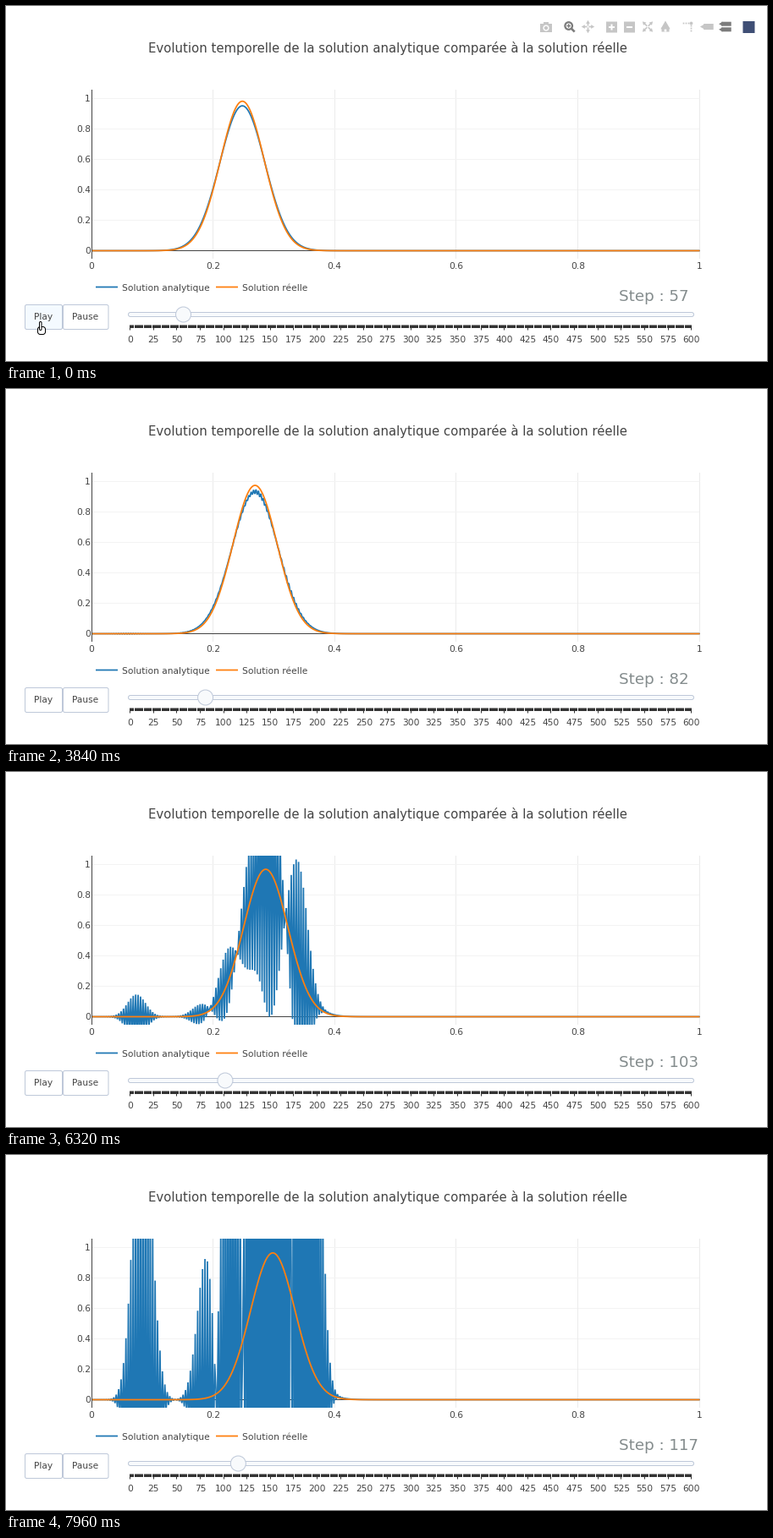
A matplotlib script that plays this animation: 899 by 420 pixels, repeating every 8000 ms.

```python
import numpy as np
import matplotlib.pyplot as plt
from matplotlib.animation import FuncAnimation
from matplotlib.collections import LineCollection
from matplotlib.patches import Circle, FancyBboxPatch, Polygon, Rectangle

W, H, DPI = 899, 420, 100
FRAMES, INTERVAL = 160, 50
PT = 72 / DPI
SMALL = 10.6
BLUE, ORANGE, INK, EDGE = "#1f77b4", "#ff7f0e", "#444444", "#bec8d9"
LIGHT, DARK, HOVER = "#c6c6c6", "#7c7c7c", "#f4faff"
LEFT, RIGHT, TOP, BOTTOM, ZERO, UNIT = 101.5, 819.5, 99, 299, 289.5, 180

plt.rcParams["font.family"] = "DejaVu Sans"
plt.rcParams["path.simplify"] = False
plt.rcParams["path.snap"] = False

fig = plt.figure(figsize=(W / DPI, H / DPI), dpi=DPI, facecolor="white")
ax = fig.add_axes([0, 0, 1, 1])
ax.set_xlim(0, W)
ax.set_ylim(H, 0)
ax.axis("off")


def px(x):
    return LEFT + (RIGHT - LEFT) * x


def py(y):
    return ZERO - UNIT * y


def label(x, y, s, size=SMALL, ha="center", color=INK):
    return ax.text(x, y, s, fontsize=size * PT, ha=ha, va="baseline",
                   color=color, zorder=6)


def line(xs, ys, color, width=1.0, z=1, **kw):
    return ax.plot(xs, ys, color=color, lw=width * PT, zorder=z,
                   solid_capstyle="butt", **kw)[0]


def add(patch, z=3):
    patch.set_zorder(z)
    return ax.add_patch(patch)


def box(x, y, w, h, radius, face, edge=EDGE, z=3):
    shape = f"round,pad=0,rounding_size={radius}"
    return add(FancyBboxPatch((x, y), w, h, boxstyle=shape, fc=face, ec=edge, lw=PT), z)


# Plot area
label(450.7, 55, "Evolution temporelle de la solution analytique comparée à la solution réelle", 14.9)
for k in range(6):
    v = k / 5
    if k:
        line([round(px(v)) - 0.5] * 2, [TOP, BOTTOM], "#ebebeb")
        line([LEFT, RIGHT], [py(v)] * 2, "#f3f3f3")
    label(px(v) - 0.5, 311, f"{v:g}")
    label(100, py(v) + 3.8, f"{v:g}", ha="right")
line([LEFT, RIGHT], [ZERO] * 2, INK, z=2)
line([LEFT] * 2, [TOP, BOTTOM], INK, z=2)

clip = Rectangle((LEFT, TOP), RIGHT - LEFT, BOTTOM - TOP, transform=ax.transData)
numeric = line([], [], BLUE, 1.76, 4, solid_joinstyle="bevel")
exact = line([], [], ORANGE, 1.76, 5, solid_joinstyle="round")
for curve in (numeric, exact):
    curve.set_clip_path(clip)

for x, color, name in ((106, BLUE, "Solution analytique"), (248, ORANGE, "Solution réelle")):
    line([x, x + 26], [332.5] * 2, color, 1.76)
    label(x + 31, 336.8, name, ha="left")

# Buttons and slider
play = box(22.5, 353.5, 44, 29, 2, HOVER)
box(67.5, 353.5, 53.5, 29, 2, "white")
label(44.3, 371, "Play")
label(94, 371, "Pause")

SLIDE0, SLIDE = 146.5, 1.1055
box(144.5, 362.5, 668, 5, 2.5, "#f8fafc")
handle = add(Circle((SLIDE0, 365), 9, fc="#f8fafc", ec=EDGE, lw=PT), 6)
ticks = []
for k in range(601):
    major = k % 25 == 0
    x = np.floor(SLIDE0 + SLIDE * k) + 0.5
    ticks.append([(x, 377.5), (x, 383.5 if major else 381)])
    if major:
        label(SLIDE0 + SLIDE * k, 398, str(k))
ax.add_collection(LineCollection(ticks, colors="#333333", linewidths=PT))
step_text = label(724, 349, "", 18.3, "left", "#848c8d")

# Toolbar, every icon built around its centre on one row
ROW = 24.5
toolbar = []


def rect(x, dy, w, h, color=LIGHT):
    toolbar.append(add(Rectangle((x - w / 2, ROW + dy - h / 2), w, h, fc=color, lw=0)))


def ring(x, dy, r, face, edge="none", width=0.0):
    toolbar.append(add(Circle((x, ROW + dy), r, fc=face, ec=edge, lw=width * PT)))


def wedge(x, dy, r, angle, color=LIGHT):
    """Triangle whose tip lies at distance r from its middle."""
    a = angle + np.array([0, 2, 4]) * np.pi / 3
    points = np.column_stack([x + r * np.cos(a), ROW + dy + r * np.sin(a)])
    toolbar.append(add(Polygon(points, fc=color, lw=0)))


def camera(x):
    rect(x, 1.5, 14, 10)
    rect(x, -4, 6, 3)
    ring(x, 1.5, 2.9, LIGHT, "white", 1.4)


def lens(x):
    ring(x - 1, -1, 4.3, "white", DARK, 2.2)
    toolbar.append(line([x + 2, x + 6], [ROW + 2, ROW + 6], DARK, 2.6, 4))
    rect(x - 1, -1, 4.5, 1.5, DARK)
    rect(x - 1, -1, 1.5, 4.5, DARK)


def arrows(x, turn, reach):
    for a in turn + np.arange(4) * np.pi / 2:
        c, s = np.cos(a), np.sin(a)
        toolbar.append(line([x + c, x + reach * c], [ROW + s, ROW + reach * s], LIGHT, 1.6, 4))
        wedge(x + reach * c, reach * s, 2.7, a)


def zoom(x, plus):
    rect(x, 0.5, 13, 13)
    rect(x, 0.5, 7, 2, "white")
    if plus:
        rect(x, 0.5, 2, 7, "white")


def home(x):
    wedge(x, -0.5, 6.5, -np.pi / 2)
    rect(x, 3.5, 9, 5)
    rect(x, 4.5, 2.6, 3, "white")


def spikes(x):
    for k in range(3):
        rect(x - 5 + 3 * k, -4, 1.7, 1.7)
        rect(x + 4, -1 + 3 * k, 1.7, 1.7)
    ring(x + 4, -4, 1.9, LIGHT)


def tag(x, dy, h, color):
    rect(x + 1.5, dy, 11.5, h, color)
    wedge(x - 4.5, dy, h / 3 ** 0.5, np.pi, color)


camera(638)
lens(665.7)
arrows(687.5, 0, 5)
zoom(715.5, True)
zoom(736.5, False)
arrows(758, np.pi / 4, 6)
home(779)
spikes(805.5)
tag(828.5, 0, 7, LIGHT)
tag(849.5, -3.3, 5, DARK)
tag(849.5, 3.3, 5, DARK)
rect(877.5, 0.5, 14, 14, "#3f4f75")

# Pointing hand: palm first, then the finger laid over it
hand = [box(37.5, 379.5, 9, 9, 3, "white", "black", 9),
        box(39.5, 373.5, 2.5, 10, 1.2, "white", "black", 10)]
HAND_Y = [part.get_y() for part in hand]

# Two-point ripples that grow around a few peaks while drifting right
GRID = np.linspace(0, 1, 501)
SIGNS = 1 - 2 * (np.arange(GRID.size) % 2)
PEAK_X = [0.069, 0.175, 0.217, 0.256, 0.289, 0.336]
PEAK_Y = [0.045, -0.021, 0.068, -0.11, -0.27, 0.21]
SPREAD, DRIFT, GROWTH, ONSET = 0.015, 0.0007, 0.19, 97


def pulse(step, widening):
    grow = 1 + widening * step
    return np.exp(-(GRID - 0.2 - step / 1200) ** 2 / (0.0025 * grow)) / np.sqrt(grow)


def ripple(step):
    age = step - ONSET
    envelope = sum(y * np.exp(-((GRID - x - DRIFT * age) / SPREAD) ** 2 / 2)
                   for x, y in zip(PEAK_X, PEAK_Y))
    return SIGNS * envelope * np.exp(GROWTH * age)


def ease(t, start, end):
    u = np.clip((t - start) / (end - start), 0, 1)
    return u * u * (3 - 2 * u)


def update(frame):
    t = frame * INTERVAL
    step = max(57, 63 + (t - 1545) / 118.3)
    numeric.set_data(px(GRID), py(pulse(step, 0.0018) + ripple(step)))
    exact.set_data(px(GRID), py(pulse(step, 0.00063)))
    step_text.set_text(f"Step : {int(step)}")
    handle.center = (SLIDE0 + SLIDE * max(57, step - 1.5), 365)

    drop = 50 * ease(t, 950, 1300)
    for part, y in zip(hand, HAND_Y):
        part.set_y(y + drop)
    play.set_facecolor(HOVER if drop < 10 else "white")
    fade = 1 - ease(t, 1200, 1500)
    for part in toolbar:
        part.set_alpha(fade)
    return []


anim = FuncAnimation(fig, update, frames=FRAMES, interval=INTERVAL,
                     init_func=lambda: update(0), repeat=True)
plt.show()
```
